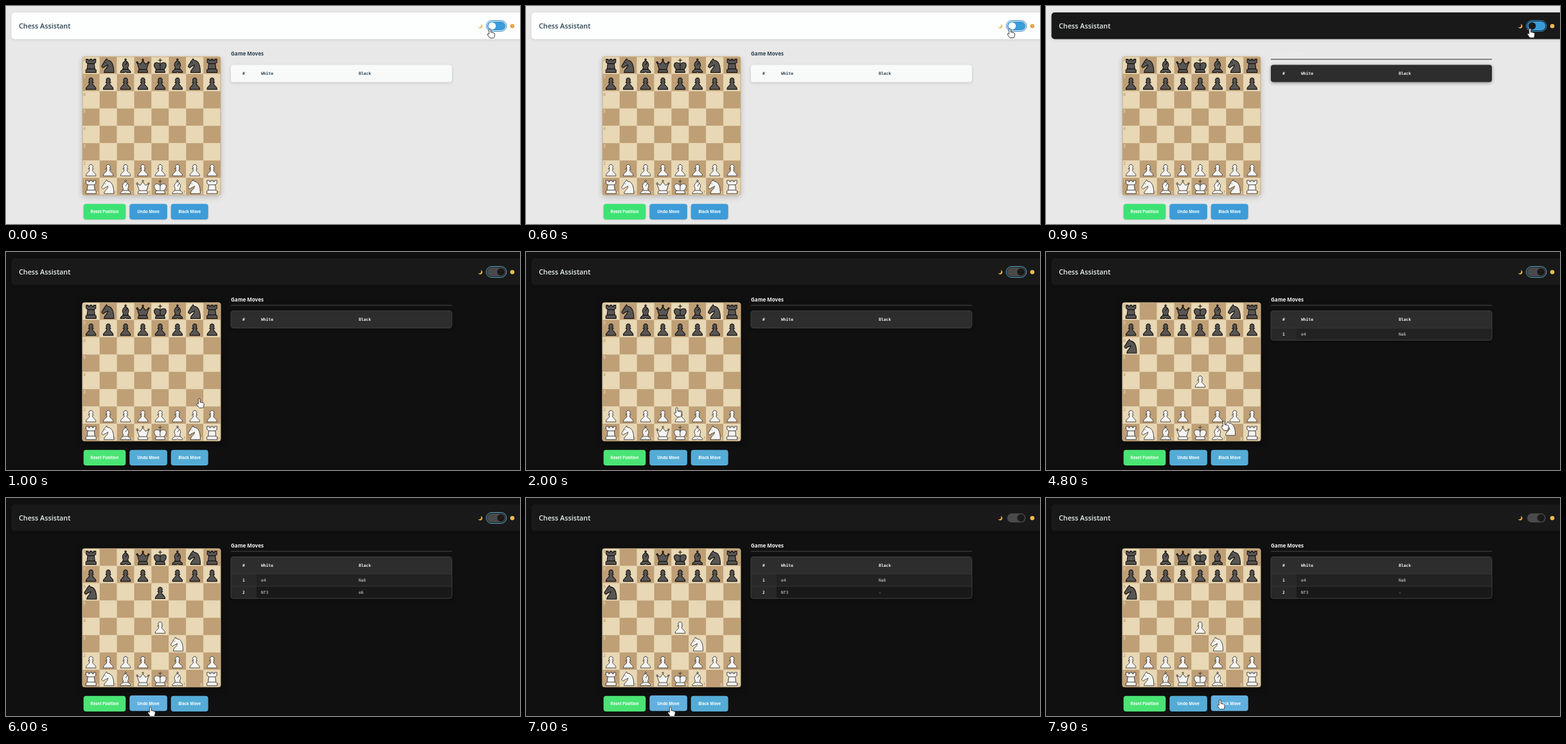
Write an HTML page with a canvas that moves like this. It is 800 px wide and 339 px high and loops after 8 s.

```html
<!DOCTYPE html>
<html lang="en">
<head>
<meta charset="utf-8">
<title>Chess Assistant</title>
<style>
html, body { margin: 0; width: 100%; height: 100%; overflow: hidden; background: #e8e8e8; }
canvas { display: block; width: 800px; height: 339px; }
</style>
</head>
<body>
<canvas id="stage"></canvas>
<script>
const W = 800, H = 339, LOOP = 8000, STEP = 100;
const canvas = document.getElementById('stage');
const ctx = canvas.getContext('2d');
const dpr = window.devicePixelRatio || 1;
canvas.width = W * dpr;
canvas.height = H * dpr;

const SANS = '"Open Sans", "Noto Sans", sans-serif';
const MONO = '"DejaVu Sans Mono", "Liberation Mono", monospace';
const BX = 118.8, BY = 78.7, CELL = 26.92;
const LIGHT_SQ = '#e8d8b5', DARK_SQ = '#bf9f76';

const T = { panels: 900, dark: 1000, undo: 6200 };

// Cursor path: time, x, y of the middle of the hand
const PATH = [
  [0, 755.5, 42.5], [900, 755.5, 42], [1000, 303, 235], [1600, 237, 249],
  [2100, 237, 249], [2700, 237, 196], [3000, 237, 196], [3600, 156, 89],
  [4100, 129, 143], [4200, 129, 143], [4600, 287, 276], [4800, 279, 270],
  [5200, 260, 222], [5400, 237, 115], [5600, 237, 142], [6000, 227, 332],
  [7300, 227, 332], [7900, 273, 321]
];

const MOVES = [
  { from: 'e2', to: 'e4', grab: 2100, drop: 2700, dx: 3, dy: 5, san: 'e4' },
  { from: 'b8', to: 'a6', grab: 3600, drop: 4100, dx: 3, dy: 4, san: 'Na6' },
  { from: 'g1', to: 'f3', grab: 4600, drop: 5200, dx: 7, dy: 4, san: 'Nf3' },
  { from: 'e7', to: 'e6', grab: 5400, drop: 5600, dx: 3, dy: 4, san: 'e6', undo: T.undo }
];

// Each piece: outline, inner lines, balls on top; drawn in a 27 unit square
const SHAPES = {
  p: { body: 'M11.3 11.8a3.2 3.2 0 1 1 4.4 0l1.8 1.3-1.9 1c.4 2.6 1.2 3.6 3.4 5.2 1.5 1.1 2.2 2.6 2.2 4.7H5.8c0-2.1.7-3.6 2.2-4.7 2.2-1.6 3-2.6 3.4-5.2l-1.9-1z' },
  r: {
    body: 'M6 4h3.4v2h2.4v-2h3.4v2h2.4v-2H21v5l-2.4 2 .9 8.2 2 1.5v4h-16v-4l2-1.5.9-8.2L6 9z',
    lines: 'M8.4 11h10.2M7.5 19.2h12'
  },
  n: {
    body: 'M11 3.3l1.3 2.3C18.5 6 22.2 11 22.2 24.7H7C7 19 13.6 18 13 12.8 11 15 9.3 14.6 7.5 16 6.5 17.5 5.5 17.6 5 16.9 3.4 16.6 2.8 15 3.8 13.6L7 8.7C7.2 7 8.2 6.3 9 5.8z',
    lines: 'M8.9 9.4l.4.2'
  },
  b: {
    body: 'M13.5 6c-5 3-6 7.5-3.5 10.5l-.8 3.2c-.7 1.8-3.7 1.3-3.7 5H12l1.5-1 1.5 1h6.5c0-3.7-3-3.2-3.7-5l-.8-3.2c2.5-3 1.5-7.5-3.5-10.5z',
    lines: 'M9.2 19.7h8.6M16.3 8.8l-2.8 4',
    balls: [[13.5, 4.6]]
  },
  q: {
    body: 'M4.6 9.5l4.9 2.2 4-5.2 4 5.2 4.9-2.2-3 10.5c1 .8 1.6 2 1.6 4.7H6c0-2.7.6-3.9 1.6-4.7z',
    lines: 'M7.6 20h11.8',
    balls: [[4.6, 9], [13.5, 5], [22.4, 9]]
  },
  k: {
    body: 'M7.6 20C2.4 15 3.4 9.5 8.2 9.5c2.2 0 3.8.6 5.3 2.5 1.5-1.9 3.1-2.5 5.3-2.5 4.8 0 5.8 5.5.6 10.5 1 .8 1.6 2 1.6 4.7H6c0-2.7.6-3.9 1.6-4.7z',
    lines: 'M7.6 20h11.8M13.5 3.2v8.6M11 5.6h5M13.5 12v7'
  }
};
for (const s of Object.values(SHAPES)) {
  s.body = new Path2D(s.body);
  if (s.lines) s.lines = new Path2D(s.lines);
}
const HAND = new Path2D('M-2.3-7q1.4 0 1.4 1.4v4l4.4 1q2 .5 1.8 2.5l-.8 4q-.3 1.5-1.8 1.5h-4.2q-1 0-1.6-.9l-3-4.2q-.6-1.2.6-1.6.9-.2 1.8.8v-7q0-1.5 1.4-1.5z');

function box(x, y, w, h, r, fill, stroke) {
  ctx.beginPath();
  ctx.roundRect(x, y, w, h, r);
  if (fill) { ctx.fillStyle = fill; ctx.fill(); }
  if (stroke) { ctx.strokeStyle = stroke; ctx.lineWidth = 1; ctx.stroke(); }
}

function shadowed(color, blur, dy, draw) {
  ctx.save();
  ctx.shadowColor = color;
  ctx.shadowBlur = blur * dpr;
  ctx.shadowOffsetY = dy * dpr;
  draw();
  ctx.restore();
}

function disc(x, y, r, fill) {
  ctx.beginPath();
  ctx.arc(x, y, r, 0, 7);
  ctx.fillStyle = fill;
  ctx.fill();
}

function text(str, x, y, font, color, align = 'left') {
  ctx.font = font;
  ctx.fillStyle = color;
  ctx.textAlign = align;
  ctx.fillText(str, x, y);
}

function cursorAt(t) {
  let i = 0;
  while (i < PATH.length - 2 && t >= PATH[i + 1][0]) i++;
  const [t0, x0, y0] = PATH[i], [t1, x1, y1] = PATH[i + 1];
  const k = Math.min(1, (t - t0) / (t1 - t0));
  return { x: x0 + (x1 - x0) * k, y: y0 + (y1 - y0) * k };
}

function startBoard() {
  const board = {};
  [...'rnbqkbnr'].forEach((kind, i) => {
    const file = 'abcdefgh'[i];
    board[file + 8] = { kind };
    board[file + 7] = { kind: 'p' };
    board[file + 2] = { kind: 'p', white: true };
    board[file + 1] = { kind, white: true };
  });
  return board;
}

function drawPiece({ kind, white }, cx, cy) {
  const s = SHAPES[kind];
  ctx.save();
  ctx.translate(cx - 13.5, cy - 13.5);
  ctx.fillStyle = white ? '#f4f4f3' : '#585654';
  ctx.strokeStyle = white ? '#3a3733' : '#141210';
  ctx.lineWidth = white ? .9 : 1.1;
  ctx.lineJoin = ctx.lineCap = 'round';
  ctx.fill(s.body);
  ctx.stroke(s.body);
  if (s.lines) ctx.stroke(s.lines);
  for (const [x, y] of s.balls || []) {
    ctx.beginPath();
    ctx.arc(x, y, 1.2, 0, 7);
    ctx.fill();
    ctx.stroke();
  }
  ctx.restore();
}

function drawBoard(t, cur, dark) {
  const size = CELL * 8;
  shadowed(dark ? 'rgba(0,0,0,.5)' : 'rgba(0,0,0,.2)', 10, 3,
    () => box(BX, BY, size, size, 3, LIGHT_SQ));
  ctx.save();
  ctx.beginPath();
  ctx.roundRect(BX, BY, size, size, 3);
  ctx.clip();
  for (let r = 0; r < 8; r++) {
    for (let c = 0; c < 8; c++) {
      ctx.fillStyle = (r + c) % 2 ? DARK_SQ : LIGHT_SQ;
      ctx.fillRect(BX + c * CELL, BY + r * CELL, CELL, CELL);
    }
  }
  const font = '600 6.5px ' + SANS;
  for (let i = 0; i < 8; i++) {
    text(8 - i, BX + 1.4, BY + i * CELL + 7, font, i % 2 ? LIGHT_SQ : DARK_SQ);
    text('abcdefgh'[i], BX + (i + 1) * CELL - 1.5, BY + size - 2, font,
      i % 2 ? DARK_SQ : LIGHT_SQ, 'right');
  }
  ctx.restore();
  box(BX + .2, BY + .2, size - .4, size - .4, 3, null, '#c9ad80');

  const board = startBoard();
  let held = null;
  for (const m of MOVES) {
    if (t < m.grab || t >= m.undo) continue;
    const piece = board[m.from];
    delete board[m.from];
    if (t < m.drop) held = { piece, x: cur.x + m.dx, y: cur.y + m.dy };
    else board[m.to] = piece;
  }
  for (const [sq, piece] of Object.entries(board)) {
    const c = 'abcdefgh'.indexOf(sq[0]), r = 8 - sq[1];
    drawPiece(piece, BX + (c + .5) * CELL, BY + (r + .5) * CELL);
  }
  if (held) drawPiece(held.piece, held.x, held.y);
}

function drawHeader(panels, dark, t) {
  const back = panels ? '#191919' : '#fdfefe';
  shadowed(dark ? 'rgba(0,0,0,.2)' : 'rgba(0,0,0,.1)', 5, 1,
    () => box(8.5, 10, 820, 41.5, 5, back));
  text('Chess Assistant', 20, 35.3, '600 10.75px ' + SANS, panels ? '#eaf0f0' : '#2b4250');

  // moon and sun
  disc(738, 31.3, 3.4, '#efb64a');
  disc(736.5, 30.1, 3.1, back);
  disc(788, 31.3, 3.3, panels ? '#f0bb55' : '#e3a54c');

  if (t < T.undo) {
    box(747.5, 22.5, 31.5, 17, 8.5, dark ? '#191919' : panels ? '#10222e' : '#f5fafd',
      dark ? '#58aed2' : '#3c87b8');
  }
  box(749, 24, 28.5, 14, 7, dark ? '#4a4a4a' : '#3a9bd9');
  disc(dark ? 770.3 : 756.6, 31, 5.8, panels ? '#1a1a1a' : '#ffffff');
}

function drawTable(t, panels, dark) {
  const ink = panels ? '#f2f2f2' : '#2b4250';
  text('Game Moves', 350, 77, 'bold 8px ' + SANS, panels && !dark ? '#ebebeb' : ink);
  if (panels) {
    ctx.fillStyle = dark ? '#484848' : '#2a2a2a';
    ctx.fillRect(350, 82.4, 344, 1);
  }

  const done = MOVES.filter(m => t >= m.drop && !(t >= m.undo));
  const rows = Math.ceil(done.length / 2), rowH = 19;
  const height = 26.7 + rows * rowH;
  shadowed(panels ? 'rgba(0,0,0,.4)' : 'rgba(0,0,0,.14)', 5, 1.5,
    () => box(350, 91.5, 344, height, 4, panels ? '#2d2d2d' : '#f8fafa'));

  ctx.save();
  ctx.beginPath();
  ctx.roundRect(350, 91.5, 344, height, 4);
  ctx.clip();
  for (let i = 0; i < rows; i++) {
    const y = 118.2 + i * rowH;
    ctx.fillStyle = i % 2 ? '#191919' : '#222222';
    ctx.fillRect(350, y, 344, rowH);
    ctx.fillStyle = '#282828';
    ctx.fillRect(350, y, 40, rowH);
    ctx.fillStyle = '#363636';
    ctx.fillRect(350, y - .5, 344, 1);
  }
  ctx.restore();
  if (dark) box(350, 91.5, 344, height, 4, null, '#404040');

  const bold = 'bold 6.3px ' + MONO, plain = '6.3px ' + MONO;
  text('#', 370, 106.8, bold, ink, 'center');
  text('White', 397, 106.8, bold, ink);
  text('Black', 549, 106.8, bold, ink);
  for (let i = 0; i < rows; i++) {
    const y = 130 + i * 18.7;
    const reply = done[i * 2 + 1];
    text(i + 1, 370, y, bold, '#f2f2f2', 'center');
    text(done[i * 2].san, 397, y, plain, '#e0e0e0');
    text(reply ? reply.san : '-', 549, y, plain, '#e0e0e0');
  }
}

function drawButton(label, x, w, color, hover) {
  const y = hover ? 307 : 307.7;
  shadowed('rgba(0,0,0,.14)', 3, .7, () => box(x, y, w, 24.2, 4, color));
  text(label, x + w / 2, y + 14.7, 'bold 6.2px ' + SANS, '#ffffff', 'center');
}

function drawButtons(cur, dark) {
  const over = (x, w) => cur.x > x && cur.x < x + w && cur.y > 312;
  const blue = on => on ? '#62b0df' : dark ? '#54acd6' : '#3d9cd8';
  drawButton('Reset Position', 120.7, 65.6, dark ? '#4ae474' : '#3de374', false);
  for (const [label, x, w] of [['Undo Move', 192.3, 58.6], ['Black Move', 256.7, 58]]) {
    const on = over(x, w);
    drawButton(label, x, w, blue(on), on);
  }
}

function drawHand({ x, y }) {
  ctx.save();
  ctx.translate(x, y);
  ctx.fillStyle = '#ffffff';
  ctx.strokeStyle = '#262626';
  ctx.lineWidth = .9;
  ctx.lineJoin = 'round';
  ctx.fill(HAND);
  ctx.stroke(HAND);
  ctx.restore();
}

function draw(t) {
  const panels = t >= T.panels, dark = t >= T.dark;
  const cur = cursorAt(t);
  ctx.setTransform(dpr, 0, 0, dpr, 0, 0);
  ctx.fillStyle = dark ? '#101010' : '#e8e8e8';
  ctx.fillRect(0, 0, W, H);
  drawHeader(panels, dark, t);
  drawBoard(t, cur, dark);
  drawTable(t, panels, dark);
  drawButtons(cur, dark);
  drawHand(cur);
}

const start = performance.now();
function tick() {
  const t = (performance.now() - start) % LOOP;
  draw(Math.floor(t / STEP) * STEP);
  requestAnimationFrame(tick);
}
draw(0);
requestAnimationFrame(tick);
</script>
</body>
</html>
```
